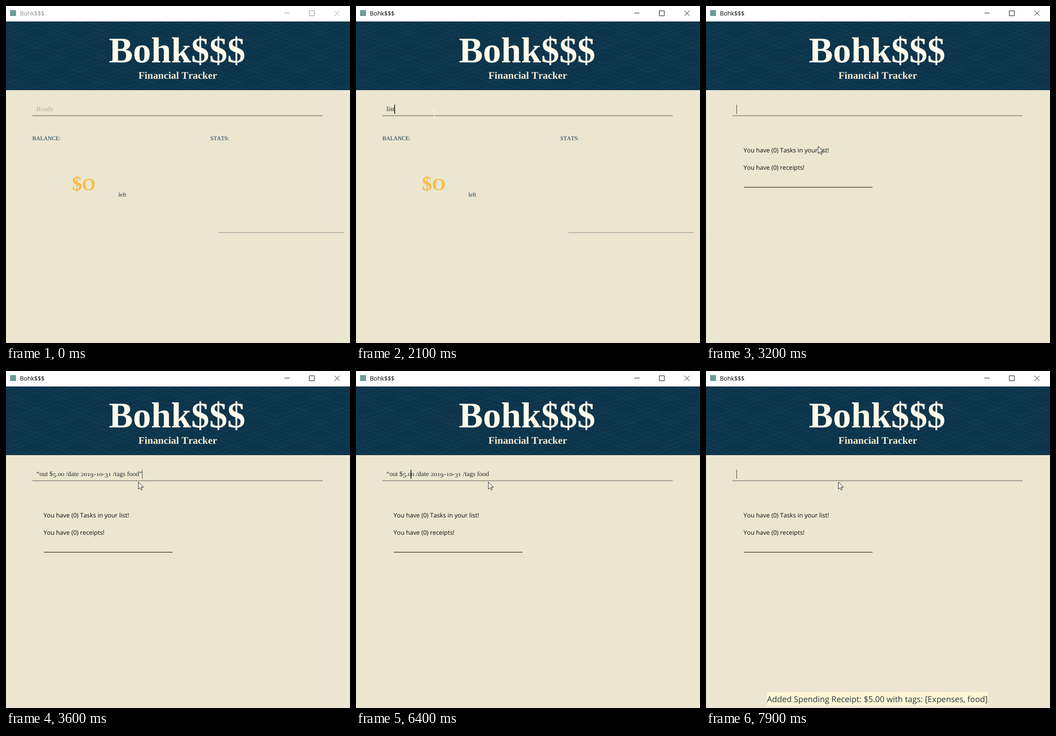
Recreate the animation shown at these times as an HTML page. Size 756 by 741 pixels, loop 8 s.

```html
<!DOCTYPE html>
<html lang="en">
<head>
<meta charset="utf-8">
<title>Bohk$$$</title>
<style>
  html, body { margin: 0; width: 100%; height: 100%; overflow: hidden; background: #ece6d0; }
  #stage { position: absolute; left: 0; top: 0; width: 756px; height: 741px; overflow: hidden; }
  svg { position: absolute; left: 0; top: 0; }
  text, #field { font-kerning: none; text-rendering: geometricPrecision; }
  .serif { font-family: "Liberation Serif", "Times New Roman", serif; }
  .sans { font-family: "Open Sans", "Noto Sans", sans-serif; }
  .bold { font-weight: 700; }
  #field {
    position: absolute; left: 67px; top: 217px; height: 20px;
    font-size: 14.5px; line-height: 20px; white-space: pre; color: #24272a;
  }
  #field.prompt { color: #b3b0aa; }
  #field i { display: inline-block; font-style: normal; transform-origin: 0 14.9px; }
  #field .short { transform: scaleY(.7); }
  #field .low { transform: translateY(2.6px) scaleY(.94); }
  #field b { display: inline-block; width: 0; height: 20px; position: relative; vertical-align: top; }
  #field b::after { content: ""; position: absolute; left: -.5px; top: 0; width: 1.4px; height: 20px; background: #3a3a38; }
</style>
</head>
<body>
<div id="stage">
  <svg width="756" height="741" viewBox="0 0 756 741">
    <rect width="756" height="741" fill="#ece6d0"/>
    <rect width="756" height="34" fill="#fff"/>
    <rect x="9" y="9" width="13" height="13" fill="#6b9c97"/>
    <g id="chrome">
      <text class="sans" x="30.5" y="21" font-size="13.2" fill="currentColor">Bohk$$$</text>
      <path d="M612 15.5h11M666.5 10.5h11v11h-11zM722 10.5l11 11M733 10.5l-11 11" fill="none" stroke="currentColor"/>
    </g>

    <svg y="34" width="756" height="151">
      <rect width="756" height="151" fill="#0c344b"/>
      <path id="waves" fill="none" stroke="#133c54" stroke-width="2"/>
    </svg>
    <text class="serif bold" x="226" y="124" font-size="79.4" fill="#fffaea">Bohk$$$</text>
    <text class="serif bold" x="291" y="160" font-size="22.3" fill="#f6ecd3">Financial Tracker</text>

    <rect x="58" y="240.4" width="638" height="1.8" fill="#8f8b84"/>

    <g id="home" class="serif" fill="#0c344b">
      <text x="58" y="294.5" font-size="12.4">BALANCE:</text>
      <text x="449" y="294.5" font-size="12.4">STATS:</text>
      <g class="bold" fill="#fabb48">
        <text x="145" y="405" font-size="44">$</text>
        <text x="167" y="404.5" font-size="38">O</text>
      </g>
      <text x="247" y="418.5" font-size="12.8">left</text>
      <rect x="467" y="497.2" width="276" height="1.8" fill="#aeaca8"/>
    </g>

    <g id="tasks" class="sans" font-size="13.5" fill="#0c0c0c">
      <text x="82.5" y="322">You have (0) Tasks in your list!</text>
      <text x="82.5" y="360">You have (0) receipts!</text>
      <rect x="83" y="397.8" width="283" height="1.4" fill="#33322e"/>
    </g>

    <g id="toast">
      <rect x="134" y="706" width="486" height="30" fill="#fff6d5"/>
      <text class="sans" x="134" y="728" font-size="17.9" fill="#2c373c">Added Spending Receipt: $5.00 with tags: [Expenses, food]</text>
    </g>
  </svg>

  <div id="field" class="serif"></div>

  <svg width="756" height="741" viewBox="0 0 756 741">
    <path id="arrow" d="M.5 .5V16.5L4.2 13L6.6 18.3L9 17.2L6.7 12H11.5Z" fill="#fff" stroke="#111"/>
    <path id="beam" d="M-2.5 -7.5H-.5L0 -7L.5 -7.5H2.5M0 -7V7M-2.5 7.5H-.5L0 7L.5 7.5H2.5" fill="none" stroke="#fff"/>
  </svg>
</div>

<script>
const LOOP = 8000, STEP = 100;
const $ = id => document.getElementById(id);
const show = (id, on) => { $(id).style.display = on ? "" : "none"; };

// Rows of shallow zigzags, every other band mirrored, form nested diamonds.
function waves() {
  let d = "";
  for (let y = -24, n = 0; y < 180; y += 9, n++) {
    const flip = Math.floor(n / 3) % 2 ? 1 : -1;
    for (let k = 0; k <= 17; k++) {
      d += (k ? "L" : "M") + (k * 48 - 30) + " " + (y + flip * (k % 2 ? 9 : -9));
    }
  }
  return d;
}

const ORDER = "out $5.00 /date 2019-10-31 /tags food";
const OPEN = "“" + ORDER;

// time, text, caret index (-1 = hidden)
const typing = [
  [0, "Ready", -1],
  [1200, "", 0], [1700, "", -1],
  [1800, "l", 1], [2000, "lis", 3], [2100, "list", 4],
  [2300, "", 0], [2700, "", -1], [3200, "", 0],
  [3600, OPEN + "”", 39], [4100, OPEN + "”", -1],
  [4700, OPEN, 38], [5200, OPEN, 37]
];
for (let k = 1; k <= 9; k++) typing.push([5600 + k * STEP, OPEN, Math.round(37 - k * 32 / 9)]);
typing.push(
  [6600, OPEN, 2], [6800, OPEN, 3], [7000, OPEN, 2], [7100, OPEN, 1],
  [7400, ORDER, 0], [7900, "", 0]
);

// time, pointer, x, y
const pointer = [
  [0, "", 0, 0],
  [300, "arrow", 97, 439], [400, "arrow", 130, 335], [500, "arrow", 190, 205],
  [600, "arrow", 234, 154], [700, "arrow", 203, 196], [800, "arrow", 166, 243],
  [1100, "beam", 172, 236.5],
  [2700, "arrow", 196, 257], [2800, "arrow", 204, 300], [2900, "arrow", 211, 344],
  [3000, "arrow", 216, 366], [3100, "arrow", 226, 348], [3200, "arrow", 246, 308],
  [3300, "arrow", 266, 273], [3400, "arrow", 282, 251], [3500, "arrow", 289, 244],
  [3600, "arrow", 290.5, 243.5]
];

const at = (table, t) => table.reduce((last, row) => row[0] <= t ? row : last);

// Old-style figures: 0-2 stay at x-height, the rest hang below the line.
function glyph(c) {
  if (/[0-2]/.test(c)) return `<i class="short">${c}</i>`;
  if (/[3-9]/.test(c)) return `<i class="low">${c}</i>`;
  return c;
}

function drawField([, text, caret]) {
  const parts = [...text].map(glyph);
  if (caret >= 0) parts.splice(caret, 0, "<b></b>");
  $("field").innerHTML = parts.join("");
  $("field").className = text === "Ready" ? "serif prompt" : "serif";
}

function drawPointer([, kind, x, y]) {
  for (const id of ["arrow", "beam"]) {
    show(id, id === kind);
    $(id).setAttribute("transform", `translate(${x} ${y})`);
  }
}

function render(t) {
  $("chrome").style.color = t < 1200 ? "#8f8f8f" : "#000";
  show("home", t < 2300);
  show("tasks", t >= 2300);
  show("toast", t >= 7900);
  drawField(at(typing, t));
  drawPointer(at(pointer, t));
}

$("waves").setAttribute("d", waves());
const start = performance.now();
let drawn = -1;
function tick() {
  const t = Math.floor((performance.now() - start) % LOOP / STEP) * STEP;
  if (t !== drawn) render(drawn = t);
  requestAnimationFrame(tick);
}
tick();
</script>
</body>
</html>
```
